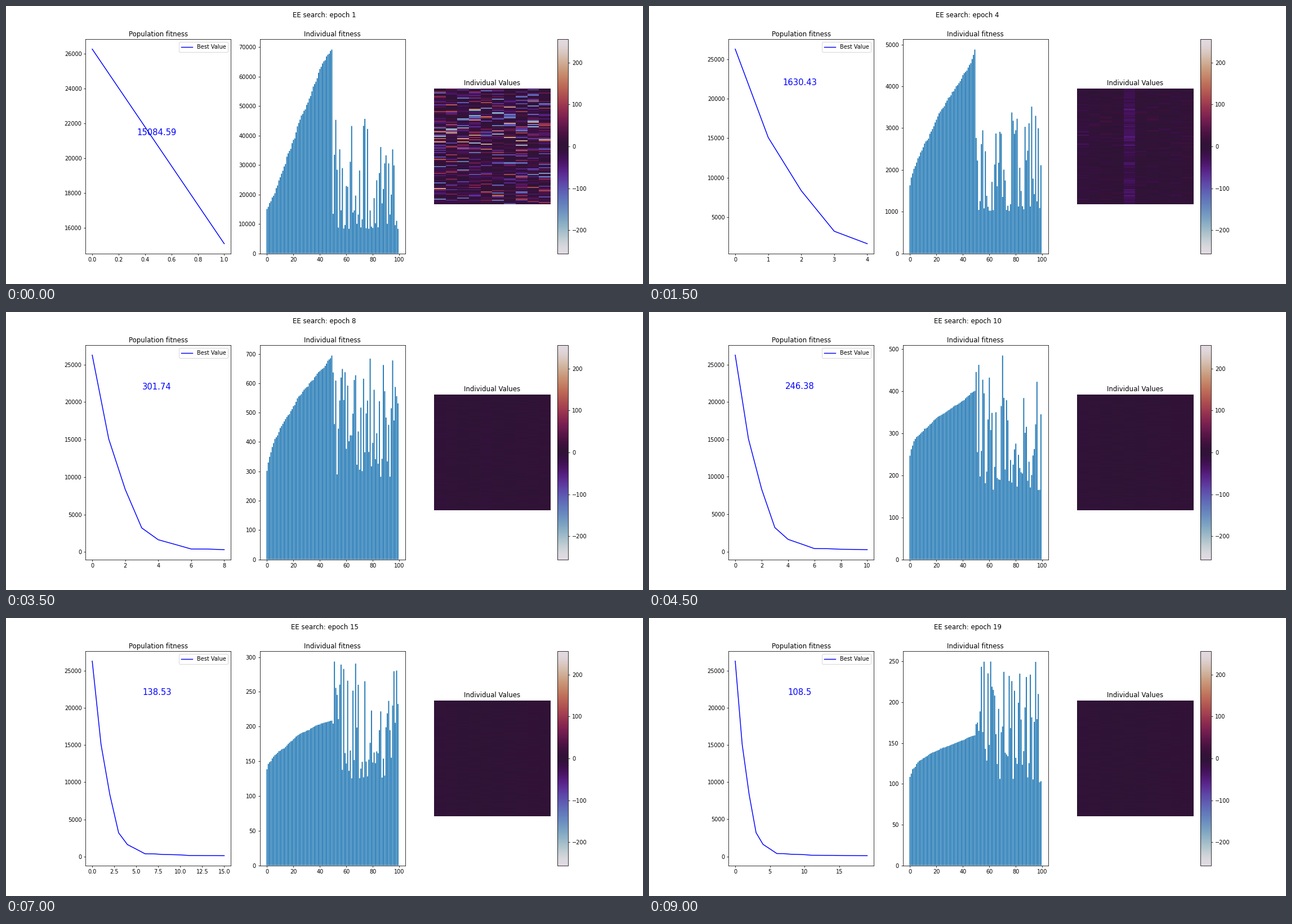
These frames come from a looping animation (1131 px wide and 495 px high, 9500 ms). A matplotlib script:

```python
import numpy as np
import matplotlib.pyplot as plt
from matplotlib.animation import FuncAnimation

EPOCHS, HALF, GENES = 19, 50, 10
SIZE, DPI = (16, 7.0027), 1131 / 16   # 1131 x 495 px

BEST = [26274, 15084.59, 8349.62, 3208.17, 1630.43, 1018.44, 393.39, 385.21,
        301.74, 281.66, 246.38, 164.93, 160.27, 152.46, 151.02, 138.53,
        125.48, 120.31, 112.15, 108.5, 102.0]

# Worst survivor at a few epochs, geometric in between
TOP_EPOCHS = [1, 2, 4, 5, 6, 7, 10, 13, 15, 19]
TOP = [69200, 25100, 4880, 2470, 1545, 915, 400, 259, 208.5, 159.5]


def survivors(epoch, rng):
    """Sorted fitness rising from the best value to the worst kept one."""
    low = BEST[epoch]
    top = np.exp(np.interp(epoch, TOP_EPOCHS, np.log(TOP)))
    steps = np.cumsum(rng.gamma(5, size=HALF - 1))
    rise = np.append(0, steps / steps[-1])
    return low + (top - low) * rise ** np.interp(epoch, [1, 4, 6, 19], [.95, .85, .65, .57])


def offspring(epoch, top, rng):
    """Random fitness between the next best value and a peak."""
    low = BEST[epoch + 1]
    peak = top * np.interp(epoch, [1, 6, 10, 19], [.66, .76, 1.21, 1.567])
    spread = rng.random(HALF)
    spread = (spread - spread.min()) / np.ptp(spread)
    return low + (peak - low) * spread ** np.interp(epoch, [1, 6], [2, 1.1])


def population(epoch):
    rng = np.random.default_rng(40 + epoch)
    kept = survivors(epoch, rng)
    return np.append(kept, offspring(epoch, kept[-1], rng))


def genes(epoch):
    """Each row's length follows the square root of its fitness."""
    epoch = min(epoch, 9)
    rng = np.random.default_rng(epoch)
    noise = rng.standard_normal((2 * HALF, GENES))
    noise *= np.abs(noise)
    noise /= np.linalg.norm(noise, axis=1, keepdims=True)
    early = np.array([-.2, -.1, .1, .05, -1, 0, 0, .05, -.1, .2])
    late = np.linspace(-.1, .2, GENES)

    def weight(*levels):
        return np.interp(epoch, [1, 4, 6, 9], levels)

    mix = (weight(1, .4, .3, .1) * noise + weight(0, .5, .45, 0) * early
           + weight(0, .1, .2, 1) * late)
    return np.clip(np.sqrt(population(epoch))[:, None] * mix, -190, 190)


plt.rcParams["font.family"] = "DejaVu Sans"
fig, (ax_best, ax_bars, ax_map) = plt.subplots(1, 3, figsize=SIZE, dpi=DPI)
heading = fig.suptitle("")

ax_best.set_title("Population fitness")
line, = ax_best.plot([], [], "b", label="Best Value")
ax_best.legend(loc="upper right")
note = ax_best.annotate("", (0, 0), xytext=(-2.5, 9.4), textcoords="offset points",
                        ha="center", color="b", fontsize=15)

ax_bars.set_title("Individual fitness")
bars = ax_bars.bar(range(2 * HALF), population(1), snap=False)

ax_map.set_title("Individual Values")
ax_map.axis("off")
image = ax_map.imshow(genes(1), cmap="twilight", vmin=-255, vmax=255,
                      aspect=GENES / (2 * HALF), interpolation="nearest")
fig.colorbar(image, ax=ax_map)


def update(i):
    epoch = i + 1
    heading.set_text(f"EE search: epoch {epoch}")

    line.set_data(range(epoch + 1), BEST[:epoch + 1])
    ax_best.relim()
    ax_best.autoscale_view()
    note.xy = (epoch / 2, .8 * BEST[0])
    note.set_text(str(round(BEST[epoch], 2)))

    fitness = population(epoch)
    for bar, height in zip(bars, fitness):
        bar.set_height(height)
    ax_bars.set_ylim(0, 1.05 * fitness.max())

    image.set_data(genes(epoch))
    return []


anim = FuncAnimation(fig, update, frames=EPOCHS, interval=500, repeat=True,
                     repeat_delay=0, init_func=lambda: update(0), blit=False)
plt.show()
```
